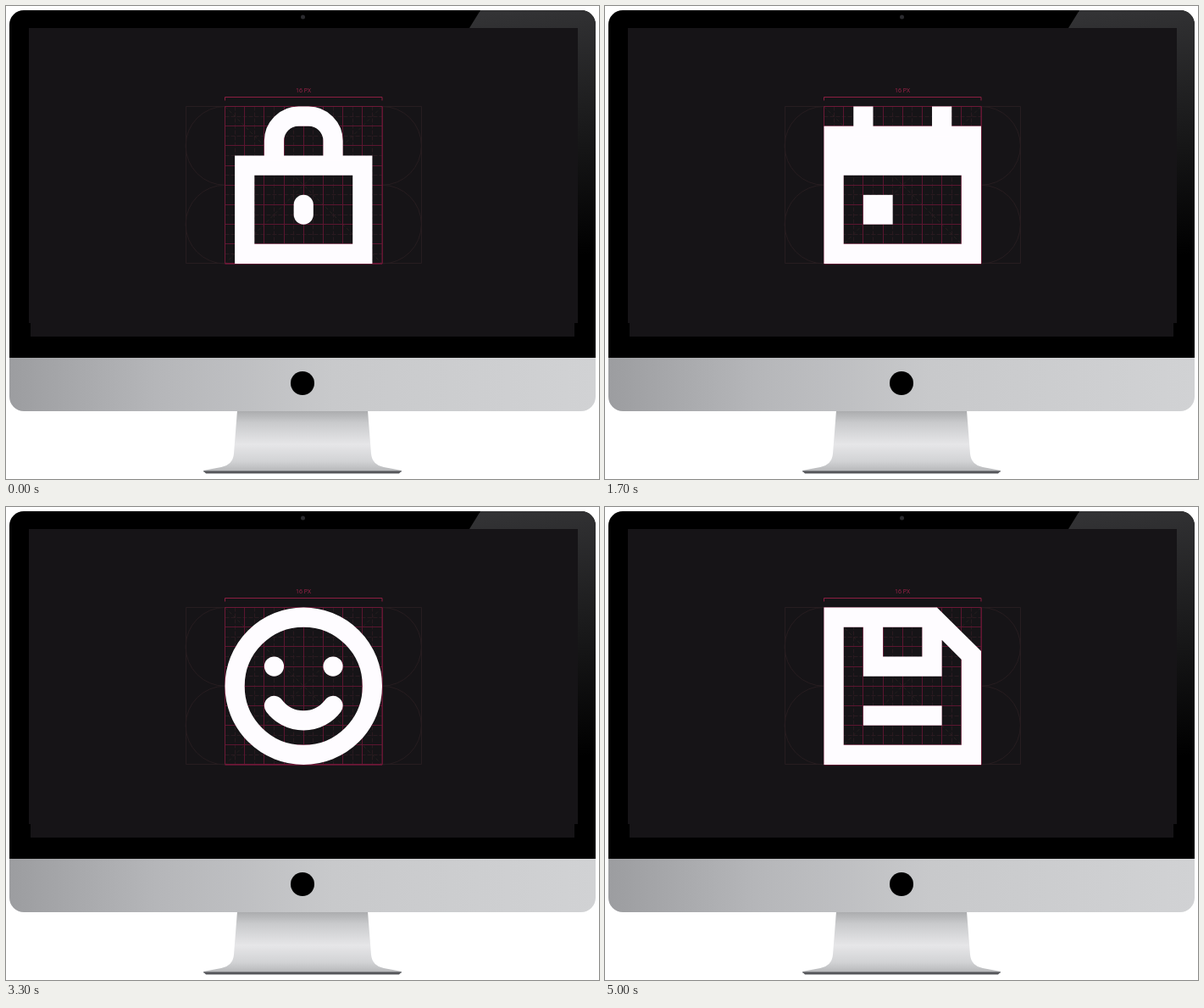
Animation, 700 px wide and 558 px high, one loop 5.3 s. Source, as an HTML page:

```html
<!DOCTYPE html>
<html lang="en">
<head>
<meta charset="utf-8">
<title>Icon grid</title>
<style>
html, body { margin: 0; width: 100%; height: 100%; overflow: hidden; background: #fff; }
svg { display: block; width: 700px; height: 558px; }
text { font: 7px "Open Sans", "Noto Sans", sans-serif; fill: #a3234b; text-anchor: middle; }
#icons { fill: #fefcff; fill-rule: evenodd; }
#icons > g { visibility: hidden; }
#icons .line { fill: none; stroke: #fefcff; stroke-width: 2; }
.round { stroke-linecap: round; }
</style>
</head>
<body>
<svg viewBox="0 0 700 558">
  <defs>
    <linearGradient id="chin">
      <stop offset="0" stop-color="#9c9da0"/>
      <stop offset=".25" stop-color="#b5b6b9"/>
      <stop offset=".55" stop-color="#c8c9cb"/>
      <stop offset="1" stop-color="#d1d2d4"/>
    </linearGradient>
    <linearGradient id="stand" x2="0" y2="1">
      <stop offset="0" stop-color="#a9aaac"/>
      <stop offset=".2" stop-color="#c9cacc"/>
      <stop offset=".55" stop-color="#e6e6e8"/>
      <stop offset=".82" stop-color="#d2d3d5"/>
      <stop offset="1" stop-color="#b4b5b7"/>
    </linearGradient>
    <linearGradient id="glare" gradientUnits="userSpaceOnUse" x1="600" y1="5" x2="640" y2="300">
      <stop offset="0" stop-color="#333335"/>
      <stop offset="1" stop-color="#000"/>
    </linearGradient>
    <clipPath id="case"><rect x="4" y="5" width="692" height="473" rx="17"/></clipPath>
  </defs>

  <path fill="url(#stand)" d="M273 477H427L431 528Q432 541 446 544L467 548V550H233V548L254 544Q268 541 269 528Z"/>
  <path fill="#55565a" d="M233 548.5H467L464 551.5H236Z"/>
  <g clip-path="url(#case)">
    <path d="M4 5H696V415H4Z"/>
    <path fill="url(#glare)" d="M560 5H696V300H675V26H547Z"/>
    <path fill="url(#chin)" d="M4 415H696V478H4Z"/>
  </g>
  <path fill="#161417" d="M27 26H675V374H671V390H29V374H27Z"/>
  <circle cx="350.5" cy="13" r="2.5" fill="#2b2b2f"/>
  <circle cx="350" cy="445" r="14"/>

  <g id="guides" fill="none"></g>
  <text x="351" y="102.3">16 PX</text>
  <g id="icons" transform="translate(258.5 118.5) scale(11.594)"></g>
</svg>
<script>
const LOOP = 5300, UNIT = 11.594, X = 258.5, Y = 118.5, SIZE = 16 * UNIT;

const fill = d => `<path d="${d}"/>`;
const line = (d, cls = '') => `<path class="line ${cls}" d="${d}"/>`;
const box = (x, y, w, h, r = 0) => `<rect x="${x}" y="${y}" width="${w}" height="${h}" rx="${r}"/>`;
const dot = (x, y, r) => `<circle cx="${x}" cy="${y}" r="${r}"/>`;
const ring = '<circle class="line" cx="8" cy="8" r="7"/>';

const pins = [4, 7, 10].map(x => box(x, 0, 2, 2.1) + box(x, 13.9, 2, 2.1)).join('')
  + [5, 9].map(y => box(0, y, 2.1, 2) + box(13.9, y, 2.1, 2)).join('');

const art = {
  lock: fill('M1 5H15V16H1ZM3 7V14H13V7Z') + box(7, 9, 2, 3, 1)
    + line('M5 5.5V3.5A2.5 2.5 0 0 1 7.5 1H8.5A2.5 2.5 0 0 1 11 3.5V5.5'),
  clock: ring + line('M8 4V9H12'),
  mouse: '<rect class="line" x="3" y="1" width="10" height="14" rx="5"/>' + box(7, 4, 2, 3, 1),
  shield: line('M8 1.1L14.5 3V8C14.5 11.5 12 13.8 8 14.9C4 13.8 1.5 11.5 1.5 8V3Z'),
  wallet: fill('M2 4H14A2 2 0 0 1 16 6V14A2 2 0 0 1 14 16H2A2 2 0 0 1 0 14V6A2 2 0 0 1 2 4ZM2 6V14H14V13H12A2 2 0 0 1 10 11V9A2 2 0 0 1 12 7H14V6ZM12 9V11H14V9Z')
    + fill('M4.6 4.1L10.75 .15L13.55 4.1ZM8.4 4H11.1L10.2 2.8Z'),
  calendar: fill('M0 2H16V16H0ZM2 7V14H14V7Z') + box(3, 0, 2, 3) + box(11, 0, 2, 3) + box(4, 9, 3, 3),
  search: '<circle class="line" cx="6.5" cy="6.5" r="5.5"/>' + line('M10.5 10.5L15.3 15.3'),
  chip: fill('M4 2H12A2 2 0 0 1 14 4V12A2 2 0 0 1 12 14H4A2 2 0 0 1 2 12V4A2 2 0 0 1 4 2ZM4 4V12H12V4Z')
    + box(6, 6, 4, 4) + pins,
  screen: fill('M0 0H16V12H0ZM2 2V10H14V2Z') + box(7, 12, 2, 2) + box(4, 14, 8, 2),
  plus: ring + line('M8 4V12M4 8H12'),
  smile: ring + dot(5, 6, 1) + dot(11, 6, 1) + line('M5 10A3.75 3.75 0 0 0 11 10', 'round'),
  info: ring + box(7, 7, 2, 5) + dot(8, 5, 1),
  heart: line('M8 14.3L2.2 8.3A4.1 4.1 0 0 1 8 2.6A4.1 4.1 0 0 1 13.8 8.3Z'),
  image: fill('M0 1H16V15H0ZM2 3V13H14V3Z') + dot(4.45, 5.5, 1.5) + line('M3 14L10 7L15 12'),
  page: fill('M2 0H10L14 4V16H2ZM4 2V14H12V5L9 2Z') + box(6, 7, 4, 2) + box(6, 10, 4, 2),
  disk: fill('M0 0H11.5L16 4.45V16H0ZM2 2V14H14V5.3L12 3.3V7H4V2ZM6 2V5H10V2Z') + box(4, 10, 8, 2)
};

const steps = [
  [0, 'lock'], [300, 'clock'], [700, 'mouse'], [1000, 'shield'],
  [1300, 'wallet'], [1700, 'calendar'], [2000, 'search'], [2300, 'chip'],
  [2700, 'screen'], [3000, 'plus'], [3300, 'smile'], [3700, 'info'],
  [4000, 'heart'], [4300, 'image'], [4700, 'page'], [5000, 'disk']
];

function guides() {
  const right = X + SIZE, bottom = Y + SIZE, r = SIZE / 4;
  const path = (d, color, extra = '') => `<path d="${d}" stroke="${color}" ${extra}/>`;
  const grid = odd => {
    let d = '';
    for (let i = odd; i <= 16; i += 2) {
      const x = Math.floor(X + i * UNIT) + .5, y = Math.floor(Y + i * UNIT) + .5;
      d += `M${x} ${Y}V${bottom}M${X} ${y}H${right}`;
    }
    return d;
  };
  let side = '';
  for (const y of [Y, Y + SIZE / 2])
    side += `M${X} ${y}a${r} ${r} 0 0 0 0 ${2 * r}M${right} ${y}a${r} ${r} 0 0 1 0 ${2 * r}`;
  const frame = `M212.5 118.5H490.5V303.5H212.5Z`;
  const cross = `M${X} ${Y}L${right} ${bottom}M${right} ${Y}L${X} ${bottom}`;
  return path(frame + side, '#271d20')
    + path(cross, '#27201f', 'stroke-dasharray="4 3"')
    + path(grid(1), '#2a1a20', 'stroke-dasharray="5 2"')
    + path(grid(0), '#5c1530')
    + path(`M258.5 118.5H444V303.5H258.5Z`, '#6d1937')
    + path('M258.5 111.5V107.5H444V111.5', '#8c1f42');
}

document.getElementById('guides').innerHTML = guides();
const icons = document.getElementById('icons');
icons.innerHTML = steps.map(([, name]) => `<g>${art[name]}</g>`).join('');

let shown;
function draw(now) {
  const t = now % LOOP;
  const next = icons.children[steps.findLastIndex(([start]) => start <= t)];
  if (next !== shown) {
    if (shown) shown.style.visibility = 'hidden';
    next.style.visibility = 'visible';
    shown = next;
  }
}

const begin = performance.now();
function tick() {
  draw(performance.now() - begin);
  requestAnimationFrame(tick);
}
tick();
</script>
</body>
</html>
```
